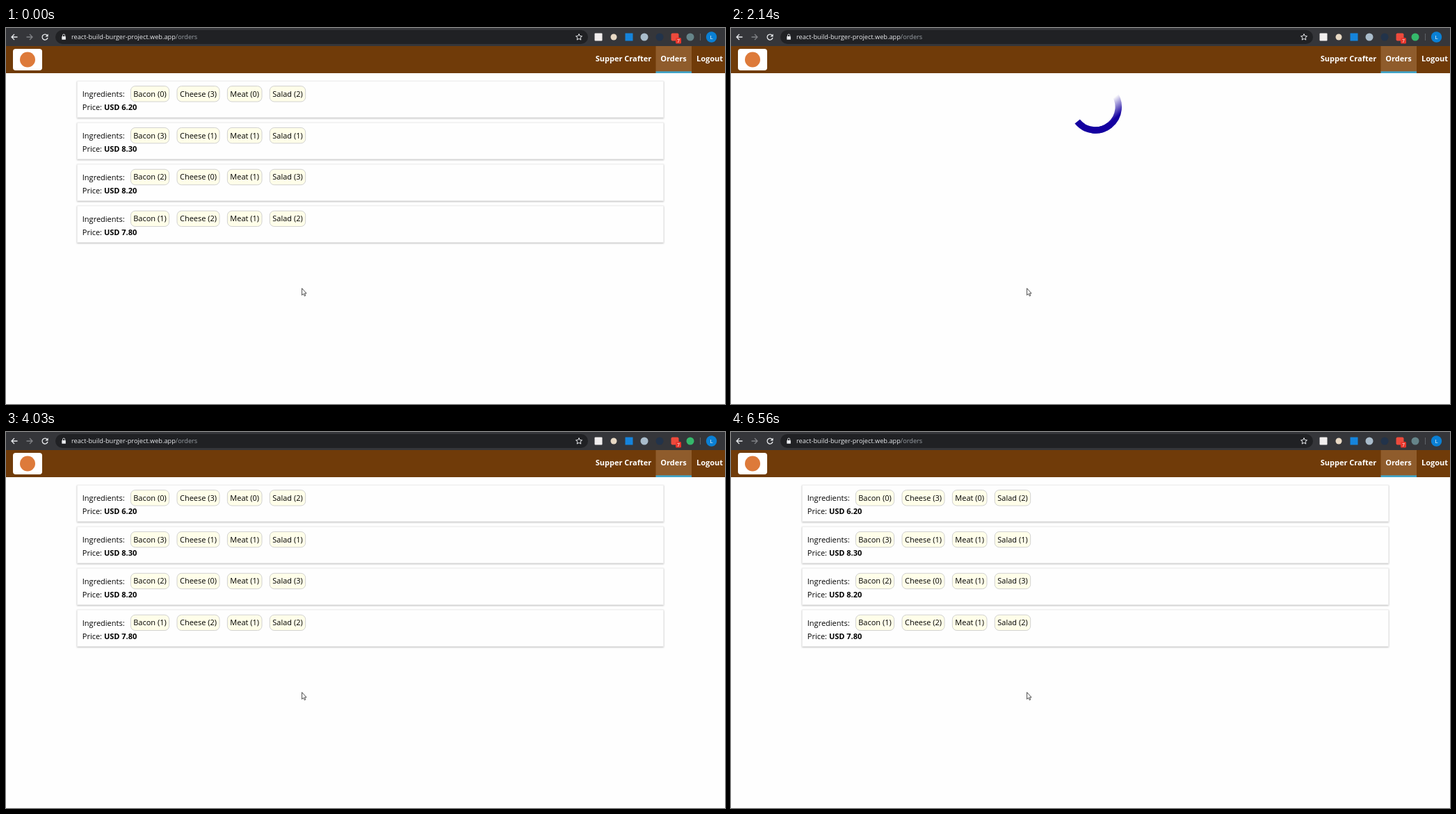
Animation, 1034 px wide and 541 px high, one loop 7.41 s. Source, as an HTML page:

```html
<!DOCTYPE html>
<html lang="en">
<head>
<meta charset="utf-8">
<title>Orders</title>
<style>
  html, body { margin: 0; width: 100%; height: 100%; overflow: hidden; background: #fefefe; }
  svg { display: block; width: 1034px; height: 541px; font: 11px "Open Sans", "Noto Sans", sans-serif; }
  .bold { font-weight: 700; }
  .nav { font-weight: 700; fill: #fff; text-anchor: middle; }
  .line { fill: none; stroke: #e8eaed; stroke-width: 1.3; }
  .card { fill: #fefefe; stroke: #eee; stroke-width: .8; filter: drop-shadow(0 1.4px 1px #bbb); }
  .chip { fill: #fffee9; stroke: #ccc; stroke-width: .9; }
</style>
</head>
<body>
<svg viewBox="0 0 1034 541">
  <defs>
    <linearGradient id="fade" gradientUnits="userSpaceOnUse" x1="-38" x2="38" y1="0" y2="0">
      <stop offset=".1" stop-color="#1400a0"/>
      <stop offset=".42" stop-color="#1400a0" stop-opacity="0"/>
    </linearGradient>
  </defs>
  <rect width="1034" height="541" fill="#fefefe"/>

  <!-- browser toolbar -->
  <rect width="1034" height="26" fill="#35363a"/>
  <rect x="71" y="3" width="766" height="20" rx="10" fill="#202124"/>
  <path class="line" d="M16.5 13H8M12 9l-4 4 4 4"/>
  <path class="line" d="M29.5 13H38M34 9l4 4-4 4" style="stroke:#808286"/>
  <g id="reload">
    <path class="line" d="M59.3 10.6A4 4 0 1 0 60 14"/>
    <path d="M60.6 8.4v4.2h-4.2z" fill="#e8eaed"/>
  </g>
  <path id="stop" class="line" d="M52 9l8 8M60 9l-8 8"/>
  <rect x="80.3" y="12" width="5.6" height="4.8" rx=".6" fill="#e8eaed"/>
  <path class="line" d="M81.5 12v-1.4a1.6 1.6 0 0 1 3.2 0V12" style="stroke-width:.9"/>
  <text x="94" y="16.4" font-size="9.2" fill="#e8eaed">react-build-burger-project.web.app<tspan fill="#9aa0a6">/orders</tspan></text>
  <path class="line" style="stroke-width:1" d="M824 8.5l1.3 3 3.2.3-2.4 2.1.7 3.2-2.8-1.7-2.8 1.7.7-3.2-2.4-2.1 3.2-.3z"/>
  <rect id="blocker" x="846.5" y="7.5" width="11" height="11" rx="1"/>
  <circle cx="874" cy="13" r="4.5" fill="#e8d9c4"/>
  <rect x="890.5" y="7.5" width="11" height="11" fill="#1584dc"/>
  <circle cx="918" cy="13" r="5.5" fill="#a9bccb"/>
  <circle cx="940" cy="13" r="5.5" fill="#22334a"/>
  <rect x="956.5" y="7.5" width="11" height="11" rx="2" fill="#ed4a3c"/>
  <rect x="963" y="14" width="8" height="8.5" rx="1.5" fill="#e8362c"/>
  <text x="967" y="21" font-size="7" fill="#fff" text-anchor="middle">7</text>
  <circle id="sync" cx="984" cy="13" r="5.5"/>
  <path d="M998.5 8v10" stroke="#5f6368"/>
  <circle cx="1014.5" cy="13" r="7.7" fill="#0a80d5"/>
  <text x="1014.5" y="15.8" font-size="8" fill="#fff" text-anchor="middle">L</text>

  <!-- page header -->
  <rect y="26" width="1034" height="39" fill="#703b09"/>
  <rect x="10" y="30" width="42" height="31" rx="4" fill="#fff"/>
  <circle cx="31" cy="45.5" r="11" fill="#dd7a3a"/>
  <rect x="934.5" y="26" width="51.5" height="39" fill="#8f5c2c"/>
  <rect x="934.5" y="62.3" width="51.5" height="2.7" fill="#40a4c8"/>
  <text class="nav" x="888" y="48.4">Supper Crafter</text>
  <text class="nav" x="960" y="48.4">Orders</text>
  <text class="nav" x="1012" y="48.4">Logout</text>

  <g id="orders"></g>

  <g id="spinner" fill="none" stroke-width="9.5">
    <circle r="33.25" stroke="url(#fade)"/>
    <path d="M-33.25 0A33.25 33.25 0 0 1 0 -33.25" stroke="#1400a0"/>
  </g>

  <g id="status">
    <path d="M0 528.3H344.5a3 3 0 0 1 3 3V541H0z" fill="#35363a"/>
    <text id="message" x="0" y="538.6" font-size="7.8" fill="#dfe1e5"></text>
  </g>
  <path d="M425.6 374.6v9.8l2.2-2 1.5 3.3 1.5-.7-1.4-3.2h2.7z" fill="#fff" stroke="#222" stroke-width=".8"/>
</svg>
<script>
const LOOP = 7410, FADE = 180, TURN = 1400, TICK = 40;
const WAITING = 'Czekam na react-build-burger-project.firebaseio.com...';
const PROCESSING = 'Przetwarzam żądanie...';

// start: reload pressed, spin: spinner appears, zero: spinner upright,
// done: toolbar idle again, show: orders appear, sync: icon turns green
const reloads = [
  { start: 790, sync: 1050, spin: 1250, zero: 1211, done: 1330, show: 2410, fade: 1535, text: WAITING },
  { start: 3280, sync: 3400, spin: 3540, zero: 3580, done: 3640, show: 3640, fade: 3850, text: WAITING },
  { start: 5080, sync: 5300, spin: 5350, zero: 5390, done: 5460, show: 5460, fade: 5650, text: PROCESSING },
  { start: 6260, sync: Infinity, spin: 6430, zero: 6470, done: 6560, show: 6560, fade: 0, text: '' }
];

const chips = [['Bacon', 179.4, 55.2], ['Cheese', 246, 61], ['Meat', 318.4, 49.6], ['Salad', 379.3, 51.4]];
const orders = [
  { counts: [0, 3, 0, 2], price: '6.20' },
  { counts: [3, 1, 1, 1], price: '8.30' },
  { counts: [2, 0, 1, 3], price: '8.20' },
  { counts: [1, 2, 1, 2], price: '7.80' }
];

const $ = id => document.getElementById(id);
const show = (id, on) => $(id).setAttribute('visibility', on ? 'visible' : 'hidden');

function orderCard({ counts, price }, row) {
  const items = chips.map(([name, x, width], i) => `
    <rect class="chip" x="${x}" y="7.6" width="${width}" height="22.4" rx="6.5"/>
    <text x="${x + width / 2}" y="22.8" text-anchor="middle">${name} (${counts[i]})</text>`).join('');
  return `<g transform="translate(0 ${76 + row * 59.85})">
    <rect class="card" x="102.4" y=".4" width="843.2" height="52.4"/>
    <text x="109.8" y="23.2">Ingredients:</text>${items}
    <text x="109.8" y="42">Price: <tspan class="bold">USD ${price}</tspan></text></g>`;
}
$('orders').innerHTML = orders.map(orderCard).join('');

function render(t) {
  const r = reloads.filter(item => item.start <= t).pop();
  const busy = !!r && t < r.done;
  const spinning = !!r && t >= r.spin && t < r.show;
  show('stop', busy);
  show('reload', !busy);
  show('orders', !spinning);
  show('spinner', spinning);
  $('blocker').setAttribute('fill', busy ? '#8b8c8e' : '#f1eeee');
  $('sync').setAttribute('fill', r && t >= r.sync ? '#35b86b' : '#66858a');

  const alpha = r ? Math.min(1, Math.max(0, 1 - (t - r.fade) / FADE)) : 0;
  $('status').setAttribute('opacity', alpha);
  $('message').textContent = r ? r.text : '';

  if (spinning) {
    const held = Math.floor((t - 1670) / TICK) * TICK + 1670;
    const angle = Math.max(0, held - r.zero) / TURN * 360;
    $('spinner').setAttribute('transform', `translate(524 113.7) rotate(${angle})`);
  }
}

const origin = performance.now();
function frame() {
  render((performance.now() - origin) % LOOP);
  requestAnimationFrame(frame);
}
frame();
</script>
</body>
</html>
```
